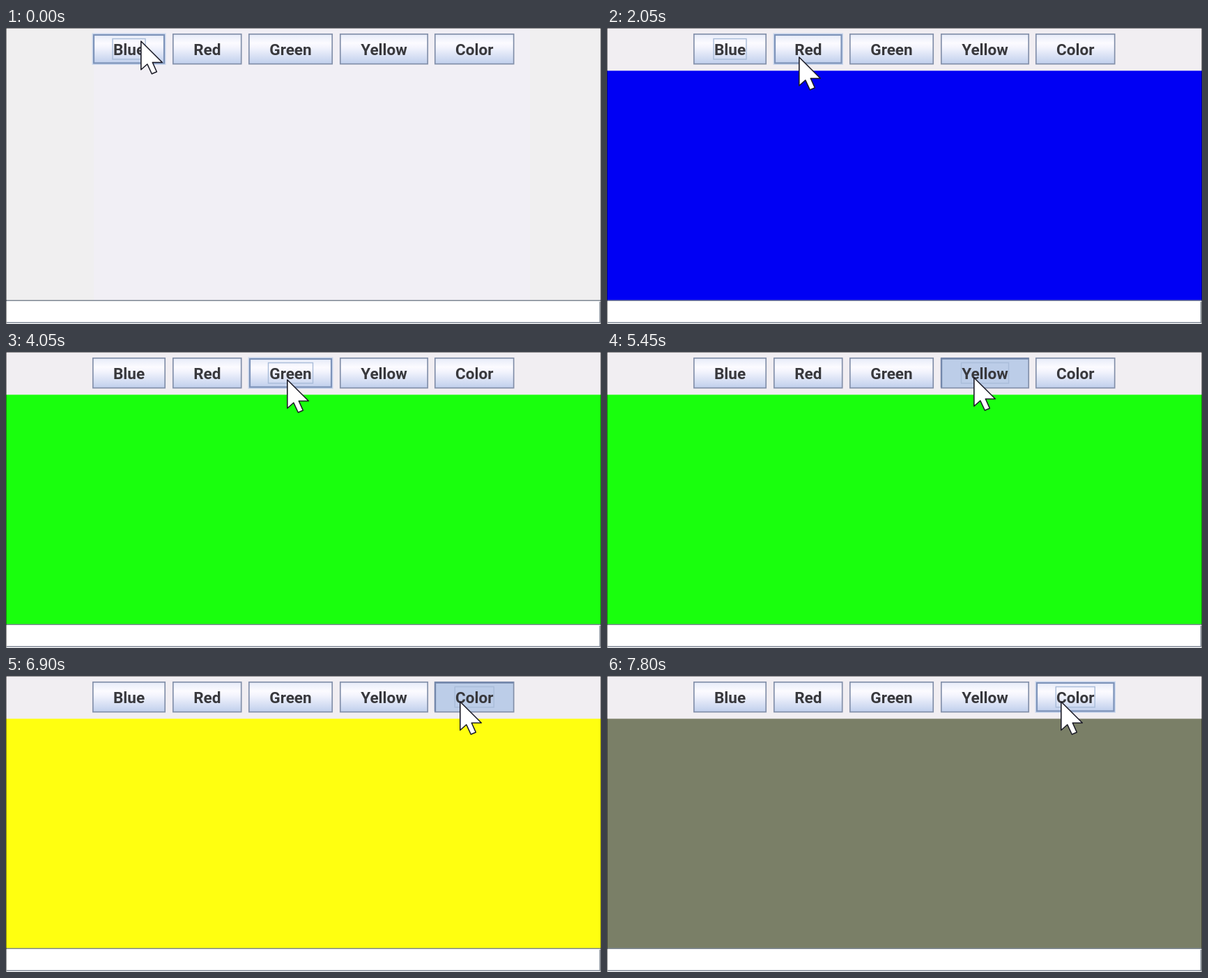
Write an HTML page that moves like this. It is 854 px wide and 426 px high and loops after 8000 ms.

```html
<!DOCTYPE html>
<html lang="en">
<head>
<meta charset="utf-8">
<title>Colour buttons</title>
<style>
html, body { margin: 0; width: 100%; height: 100%; overflow: hidden; background: #f1eff3; }
svg { display: block; }
text { font: bold 22.5px Roboto, "Liberation Sans", Arial, sans-serif; fill: #38383c; text-anchor: middle; }
</style>
</head>
<body>
<svg id="stage" width="854" height="426" viewBox="0 0 854 426">
  <defs>
    <linearGradient id="metal" x1="0" y1="0" x2="0" y2="1">
      <stop offset="0" stop-color="#e6ebf8"/>
      <stop offset=".3" stop-color="#fcfbff"/>
      <stop offset=".45" stop-color="#f3f4fd"/>
      <stop offset="1" stop-color="#c0cfec"/>
    </linearGradient>
  </defs>
  <rect width="854" height="426" fill="#f0eff0"/>
  <rect x="126" width="626" height="392" fill="#f1eff5"/>
  <g id="panel">
    <rect width="854" height="62" fill="#f1eef2"/>
    <rect id="fill" y="61.5" width="854" height="330.5"/>
  </g>
  <rect y="393" width="854" height="33" fill="#fff"/>
  <path d="M0 392.3H854M852.5 394V424M1 424H853" stroke="#7e8794" stroke-width="1.5" fill="none"/>
  <path d="M0 .5H854M.5 0V426M853.5 0V426" stroke="#000" stroke-opacity=".42" fill="none"/>
  <g id="buttons"></g>
  <path id="cursor" d="M0 0V41L9 33 15.5 47 22.5 44 16.5 30.5H30.5Z" fill="#fff" stroke="#1c1c28" stroke-width="1.6" stroke-linejoin="round"/>
</svg>
<script>
const LOOP = 8000, STEP = 50;
const $ = id => document.getElementById(id);

function add(parent, tag, attrs) {
  const node = document.createElementNS("http://www.w3.org/2000/svg", tag);
  set(node, attrs);
  return parent.appendChild(node);
}
function set(node, attrs) {
  for (const key in attrs) node.setAttribute(key, attrs[key]);
}

// label, left, right, half width of the focus box
const buttons = [
  ["Blue", 124, 229, 23.5], ["Red", 239, 338.5, 21], ["Green", 348, 469, 32],
  ["Yellow", 479, 606, 34], ["Color", 615, 729.5, 28]
].map(([label, left, right, half]) => {
  const g = $("buttons"), mid = (left + right) / 2, width = right - left;
  const glow = add(g, "rect", { x: left - .5, y: 7.5, width: width + 1, height: 45.5, fill: "#cbd8ee" });
  const face = add(g, "rect", {});
  const shade = add(g, "path", { d: `M${left + 1} 51V9.5H${right - 1}`, fill: "none", stroke: "#7387ab", "stroke-width": 2.4 });
  const focus = add(g, "rect", { x: mid - half, y: 15.5, width: half * 2, height: 29.5, fill: "none", stroke: "#a9bcd9", "stroke-width": 1.4 });
  add(g, "text", { x: mid, y: 39.4 }).textContent = label;
  return { left, right, width, glow, face, shade, focus };
});

const moves = [
  { from: 0, to: 400, x: 200.8, y: 18 },
  { from: 1500, to: 1850, x: 275.8, y: 42 },
  { from: 2900, to: 3300, x: 388.8, y: 42 },
  { from: 3450, to: 3650, x: 403.8, y: 40 },
  { from: 4350, to: 4650, x: 526.8, y: 37 },
  { from: 5900, to: 6450, x: 651.8, y: 37 }
];
const clicks = [
  { down: 850, up: 1000, button: 0, color: "#0000f4" },
  { down: 2500, up: 2650, button: 1, color: "#e60000" },
  { down: 3850, up: 4000, button: 2, color: "#19ff0d" },
  { down: 5450, up: 5600, button: 3, color: "#ffff10" },
  { down: 6750, up: 7000, button: 4, color: "#808478" },
  { down: 7550, up: 7700, button: 4, color: "#7a7f67" }
];

function pointerAt(t) {
  let x = 193.8, y = 19;
  for (const m of moves) {
    const p = Math.min(1, Math.max(0, (t - m.from) / (m.to - m.from)));
    const eased = p * p * (3 - 2 * p);
    x += (m.x - x) * eased;
    y += (m.y - y) * eased;
  }
  return { x, y };
}

function draw(t) {
  const pointer = pointerAt(t);
  let focused = 0, pressed = -1, color = null;
  for (const c of clicks) {
    if (t < c.down) break;
    focused = c.button;
    if (t < c.up) pressed = c.button;
    else color = c.color;
  }
  $("panel").style.display = color ? "" : "none";
  if (color) set($("fill"), { fill: color });

  buttons.forEach((b, i) => {
    const down = i === pressed;
    const hover = !down && pointer.x >= b.left && pointer.x <= b.right;
    const inset = hover ? 2 : .8;
    set(b.face, {
      x: b.left + inset, y: 8 + inset,
      width: b.width - inset * 2, height: 44.5 - inset * 2,
      fill: down ? "#bccde8" : "url(#metal)",
      stroke: hover ? "#7d93b9" : "#8390aa",
      "stroke-width": hover ? 2.2 : 1.7
    });
    b.glow.style.display = hover ? "" : "none";
    b.shade.style.display = down ? "" : "none";
    b.focus.style.display = i === focused ? "" : "none";
  });
  set($("cursor"), { transform: `translate(${pointer.x} ${pointer.y})` });
}

const start = performance.now();
function tick() {
  const t = (performance.now() - start) % LOOP;
  draw(Math.floor(t / STEP) * STEP);
  requestAnimationFrame(tick);
}
tick();
</script>
</body>
</html>
```
